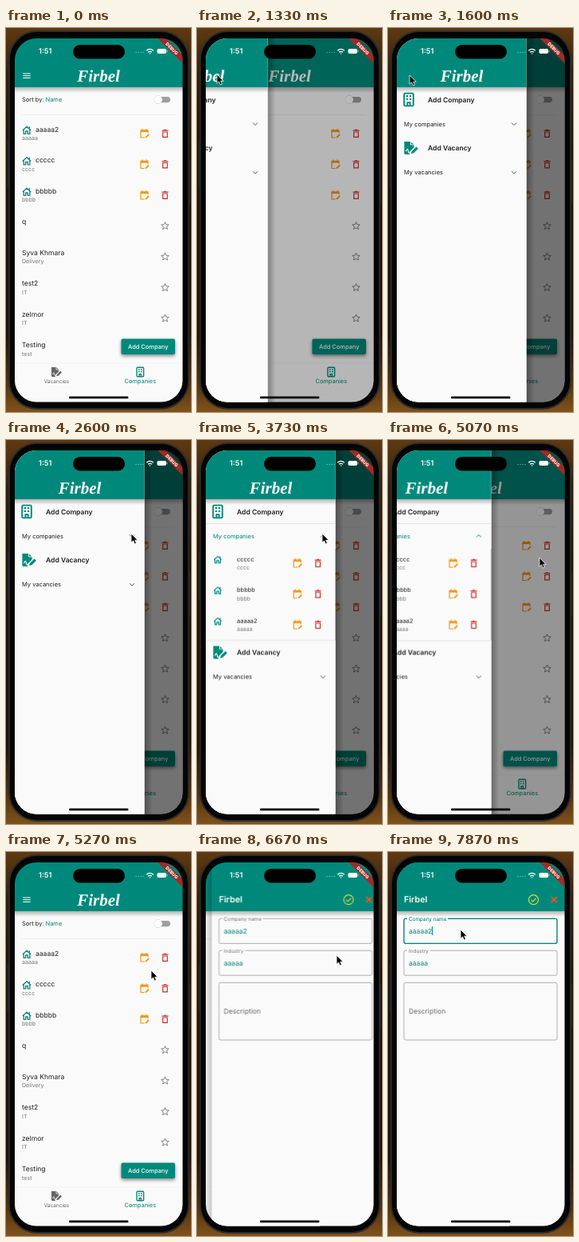
An HTML page for the animation above (8000 ms loop, 232 by 480 pixels).

```html
<!DOCTYPE html>
<html lang="en">
<head>
<meta charset="utf-8">
<title>Company list</title>
<style>
html, body { margin: 0; width: 100%; height: 100%; overflow: hidden; background: #000; }
svg { display: block; width: 100%; height: 100%; font-family: Inter, Roboto, sans-serif; text-rendering: geometricPrecision; }
.logo { font: italic bold 21px "Liberation Serif", "Noto Serif", serif; }
.teal { color: #00897b; } .orange { color: #f59412; } .red { color: #d32f2f; } .gray { color: #666; }
.dim { color: #555; }

.list, .drawer, .scrim, .rows, .lower, .rule, .open, .closed, .chevron, .edit, .focus, .cursor {
  animation: 8s linear infinite;
}
.list { animation-name: list; }
.drawer { animation-name: drawer; }
.scrim { animation-name: scrim; }
.rows { animation-name: rows; }
.lower { animation-name: lower; }
.rule, .open { animation-name: appear; }
.closed { animation-name: vanish; }
.chevron { animation-name: chevron; }
.edit { animation-name: edit; }
.focus { animation-name: focus; }
.cursor { animation-name: cursor; animation-timing-function: ease-in-out; }

@keyframes drawer {
  0%, 14.975% { transform: translateX(-174px); }
  18.225%, 62.625% { transform: none; }
  65.625%, 100% { transform: translateX(-174px); }
}
@keyframes scrim {
  0%, 14.975% { opacity: 0; }
  18.225%, 62.625% { opacity: .54; }
  65.625%, 100% { opacity: 0; }
}
@keyframes rows {
  0% { transform: translateY(-57.75px); }
  33% { transform: translateY(-57.75px); animation-timing-function: ease-in; }
  35.5%, 100% { transform: none; }
}
@keyframes lower {
  0% { transform: none; }
  33% { transform: none; animation-timing-function: ease-in; }
  35.5%, 100% { transform: translateY(115.5px); }
}
@keyframes appear { 0%, 33% { opacity: 0; } 35.5%, 100% { opacity: 1; } }
@keyframes vanish { 0%, 33% { opacity: 1; } 35.5%, 100% { opacity: 0; } }
@keyframes chevron { 0%, 33% { transform: none; } 35.5%, 100% { transform: rotate(180deg); } }
@keyframes list {
  0% { transform: none; }
  79.375% { transform: none; animation-timing-function: cubic-bezier(.35, .91, .33, .97); }
  85.625%, 100% { transform: translateX(-70px); }
}
@keyframes edit {
  0% { transform: translateX(222px); }
  79.375% { transform: translateX(222px); animation-timing-function: cubic-bezier(.35, .91, .33, .97); }
  85.625%, 100% { transform: none; }
}
@keyframes focus { 0%, 96.4% { opacity: 0; } 97.2%, 100% { opacity: 1; } }
@keyframes cursor {
  0%, 1.125% { transform: translate(242px, 250px); }
  5.875%, 8.375% { transform: translate(120px, 140px); }
  14.375%, 19.125% { transform: translate(25px, 58px); }
  29.125%, 53.375% { transform: translate(157px, 117px); }
  61.25%, 63.125% { transform: translate(190px, 147px); }
  65.875%, 69.125% { transform: translate(182px, 148px); }
  77.5%, 90.875% { transform: translate(175px, 129px); }
  96%, 100% { transform: translate(91px, 97px); }
}
</style>
</head>
<body>
<svg id="stage" viewBox="0 0 232 480">
  <defs>
    <linearGradient id="desk" x2="0" y2="1">
      <stop stop-color="#5f3a12"/><stop offset=".12" stop-color="#33200c"/>
      <stop offset=".3" stop-color="#1f1409"/><stop offset=".8" stop-color="#1f1409"/>
      <stop offset=".93" stop-color="#55340f"/><stop offset="1" stop-color="#80521a"/>
    </linearGradient>
    <linearGradient id="below" x2="0" y2="1">
      <stop stop-opacity=".28"/><stop offset="1" stop-opacity="0"/>
    </linearGradient>
    <linearGradient id="beside">
      <stop stop-opacity="0"/><stop offset="1" stop-opacity=".2"/>
    </linearGradient>
    <linearGradient id="drawerEdge">
      <stop stop-opacity=".3"/><stop offset="1" stop-opacity="0"/>
    </linearGradient>
    <clipPath id="screen"><rect x="11" y="13" width="210.5" height="454.5" rx="27"/></clipPath>

    <g id="house" fill="none" stroke="currentColor" stroke-width="1.3" stroke-linejoin="round">
      <path d="M-5.2 .2L0-4.6 5.2 .2M3.3-4.6V-2M-3.8-.8V4.6H-1.3V1.2H1.3V4.6H3.8V-.8"/>
    </g>
    <g id="building" fill="none" stroke="currentColor" stroke-width="1.4">
      <rect x="-4.3" y="-5.8" width="8.6" height="11.6" rx="1"/>
      <path d="M-2.3-3.2H-.7M.7-3.2H2.3M-2.3-.4H-.7M.7-.4H2.3" stroke-width="1.6"/>
      <path d="M-1.2 5.8V2.7H1.2V5.8"/>
    </g>
    <g id="signing">
      <path d="M-6-6H0L3-3V.2L-1 4V6H-5Q-6 6-6 5Z" fill="currentColor"/>
      <path d="M0-6V-3H3" fill="none" stroke="#fafafa" stroke-width=".7"/>
      <path d="M-4.5 3.2Q-3-1-2.3 2.8T0 3" fill="none" stroke="#fafafa" stroke-width=".9"/>
      <path d="M1.2 4.2L6.2-.8" stroke="#fafafa" stroke-width="4"/>
      <path d="M.3 5.2L1 3 5.2-1.2 7 .6 2.8 4.7Z" fill="currentColor"/>
    </g>
    <g id="calendar" fill="none" stroke="currentColor" stroke-width="1.2">
      <path d="M4.2-.5V-4.2H-4.8V5H0M-2.8-6V-4M2.2-6V-4"/>
      <path d="M-4.8-3H4.2" stroke-width="2.2"/>
      <path d="M1.2 5L5.4 .8" stroke-width="1.8"/>
    </g>
    <g id="trash" fill="none" stroke="currentColor" stroke-width="1.2">
      <path d="M-4-3.8H4M-1.4-4.6H1.4M-2.8-2V4.3H2.8V-2Z"/>
    </g>
    <path id="arrowhead" d="M-3-1.5L0 1.5 3-1.5" fill="none" stroke="currentColor" stroke-width="1"/>
  </defs>
</svg>
<script>
const TEAL = '#00897b', PAPER = '#fafafa', INK = '#212121', MUTED = '#757575';
const APP = 'Firbel', PITCH = 38.5;
const TOP = 13, HEIGHT = 455, WIDTH = 211, DRAWER = 162.5;

const text = (x, y, label, size = 8.56, fill = INK, attrs = '') =>
  `<text x="${x}" y="${y}" font-size="${size}" fill="${fill}" ${attrs}>${label}</text>`;
const rect = (x, y, w, h, fill, attrs = '') =>
  `<rect x="${x}" y="${y}" width="${w}" height="${h}" fill="${fill}" ${attrs}/>`;
const icon = (id, x, y, tone, scale = 1) =>
  `<use href="#${id}" class="${tone}" transform="translate(${x} ${y}) scale(${scale})"/>`;
const group = (name, ...parts) => `<g class="${name}">${parts.join('')}</g>`;
const middle = 'text-anchor="middle"';
const logo = x => `<text class="logo" x="${x}" y="67" fill="#fff" ${middle}>${APP}</text>`;
const sheet = width => rect(11, TOP, width, HEIGHT, PAPER);
const bar = width => rect(11, 74, width, 7, 'url(#below)') + rect(11, TOP, width, 74 - TOP, TEAL);
const actions = (x, y) => icon('calendar', x, y, 'orange') + icon('trash', x + 25.7, y, 'red');

function star(x, y) {
  const points = Array.from({ length: 10 }, (_, i) => {
    const r = i % 2 ? 2.3 : 5, a = i * Math.PI / 5;
    return `${x + r * Math.sin(a)},${y - r * Math.cos(a)}`;
  });
  return `<polygon points="${points.join(' ')}" fill="none" stroke="#757575" stroke-width=".9"/>`;
}

const companies = [
  ['aaaaa2', 'aaaaa', 1], ['ccccc', 'cccc', 1], ['bbbbb', 'bbbb', 1], ['q', ''],
  ['Syva Khmara', 'Delivery'], ['test2', 'IT'], ['zelmor', 'IT'], ['Testing', 'test']
];

const companyRow = ([name, field, own], i) => {
  const y = 130 + PITCH * i;
  return text(own ? 37 : 20, y - .4, name) + text(20, y + 10, field, 7.1, MUTED) +
    (own ? icon('house', 26, y - 2.2, 'teal') + actions(173.8, y + 2) : star(199.5, y + 2));
};

const listPage = group('list',
  sheet(WIDTH), bar(WIDTH),
  '<path d="M21.3 57h9.4M21.3 59.7h9.4M21.3 62.4h9.4" stroke="#fff"/>',
  logo(116),
  text(20, 92, 'Sort by:', 7.5), text(49.5, 92, 'Name', 7.5, TEAL),
  rect(188, 86, 18, 7.2, '#9e9e9e', 'rx="3.6"'),
  '<circle cx="191" cy="89.6" r="5.1" fill="#fff" style="filter:drop-shadow(0 .6px .7px #0007)"/>',
  rect(20, 108.3, 192, .6, '#e4e4e4'),
  companies.map(companyRow).join(''),
  rect(11, 419, WIDTH, 49, PAPER), rect(11, 418.6, WIDTH, .6, '#ededed'),
  rect(144.5, 388.5, 67.5, 19.5, TEAL, 'rx="2" style="filter:drop-shadow(0 2px 2px #0007)"'),
  text(178.2, 401, 'Add Company', 7.45, '#fff', `${middle} font-weight="500"`),
  icon('signing', 63, 430, 'gray'), text(63.5, 444, 'Vacancies', 6.5, '#666', middle),
  icon('building', 168.3, 430, 'teal'), text(168.3, 444, 'Companies', 7.45, TEAL, middle)
);

const drawerRow = ([name, field], i) => {
  const y = 152 + PITCH * i;
  return icon('house', 26, y - 2.5, 'teal', .9) + text(50, y - .3, name, 7.5) +
    text(50, y + 10, field, 7, MUTED) + actions(126, y + 2);
};

const drawer = group('drawer',
  rect(11 + DRAWER, TOP, 10, HEIGHT, 'url(#drawerEdge)'),
  sheet(DRAWER),
  group('rows', [companies[1], companies[2], companies[0]].map(drawerRow).join('')),
  group('lower',
    rect(11, 134.7, DRAWER, 334, PAPER),
    rect(11, 134.7, DRAWER, .6, '#d5d5d5', 'class="rule"'),
    icon('signing', 28.5, 150, 'teal', 1.35),
    text(50, 153.3, 'Add Vacancy', 8.56, INK, 'font-weight="600"'),
    text(20, 183.3, 'My vacancies', 7.5), icon('arrowhead', 158, 180.7, 'dim')),
  rect(11, 74, DRAWER, 62, PAPER),
  icon('building', 26, 89.5, 'teal', 1.35),
  text(50, 92.7, 'Add Company', 8.56, INK, 'font-weight="600"'),
  rect(11, 104, DRAWER, .6, '#d5d5d5', 'class="rule"'),
  text(20, 122.5, 'My companies', 7.5, INK, 'class="closed"'),
  text(20, 122.5, 'My companies', 7.5, TEAL, 'class="open"'),
  `<g transform="translate(158 120)"><g class="chevron">
    <use href="#arrowhead" class="dim closed"/><use href="#arrowhead" class="teal open"/></g></g>`,
  bar(DRAWER), logo(92.5)
);

const outline = (y, h, stroke = '#8d8d8d', width = .7) =>
  rect(20, y, 192, h, 'none', `rx="2" stroke="${stroke}" stroke-width="${width}"`);
const field = (y, label, value, gap) =>
  outline(y, 31) + rect(24, y - 2, gap, 4, PAPER) +
  text(26, y + 2.4, label, 6.4, MUTED) + text(26, y + 18.3, value, 8.56, TEAL);

const editPage = group('edit',
  rect(1, TOP, 10, HEIGHT, 'url(#beside)'),
  sheet(WIDTH), bar(WIDTH),
  text(20, 63.3, APP, 10.7, '#fff', 'font-weight="600"'),
  `<g fill="none" stroke="#cddc39" stroke-width="1.2"><circle cx="182.5" cy="59.7" r="6"/>
    <path d="M179.6 59.8l2.1 2.1 3.8-3.9"/></g>`,
  '<path d="M204.7 56.2l7 7M211.7 56.2l-7 7" stroke="#f4511e" stroke-width="1.9"/>',
  field(83.3, 'Company name', 'aaaaa2', 51), field(123.2, 'Industry', 'aaaaa', 29),
  outline(163.3, 71.7), text(26, 202, 'Description', 8.56, '#6b6b6b'),
  group('focus', outline(83.3, 31, TEAL, 1.2), rect(24, 81.3, 51, 4, PAPER),
    text(26, 85.7, 'Company name', 6.4, TEAL), rect(55, 93, 1, 11, TEAL))
);

const statusBar = group('status',
  text(41, 32, '1:51', 9.2, '#fff', 'font-weight="600"'),
  rect(84, 21, 65, 17.5, '#000', 'rx="8.75"'),
  '<path d="M162.5 30.5h11" stroke="#fff" stroke-opacity=".5" stroke-width="1.2" stroke-dasharray="1.2 1.8"/>',
  `<g fill="none" stroke="#fff" stroke-width="1.3"><path d="M176.2 28.2q4.3-3.6 8.6 0M178 30.3q2.5-2 5 0"/>
    <path d="M179.9 32h1.2"/></g>`,
  rect(189.5, 26, 11.5, 6, '#fff', 'rx="1.7"'), rect(201.6, 27.8, 1, 2.4, '#fff', 'opacity=".6"'),
  `<g transform="translate(208 25.7) rotate(45)">${rect(-30, -3.5, 60, 7, '#a32a26')}
    ${text(0, 2, 'DEBUG', 5.5, '#fff', `${middle} font-weight="800"`)}</g>`,
  rect(79, 460.5, 74.5, 2.8, '#000', 'rx="1.4"')
);

document.getElementById('stage').innerHTML +=
  rect(0, 0, 232, 480, 'url(#desk)') +
  rect(1.5, 140, 3, 60, '#222', 'rx="1"') + rect(228, 165, 3, 55, '#222', 'rx="1"') +
  rect(4, 4, 225, 472, '#050505', 'rx="35" stroke="#2e2d2c" stroke-width="1.8"') +
  `<g clip-path="url(#screen)">${listPage}${rect(11, TOP, WIDTH, HEIGHT, '#000', 'class="scrim"')}
    ${drawer}${editPage}${statusBar}</g>` +
  `<g class="cursor"><path d="M0 0V11.2L2.6 8.9 4.4 13 6.4 12.1 4.7 8.2H8.1Z"
    stroke="#fff" stroke-width=".8" stroke-linejoin="round"/></g>`;
</script>
</body>
</html>
```
